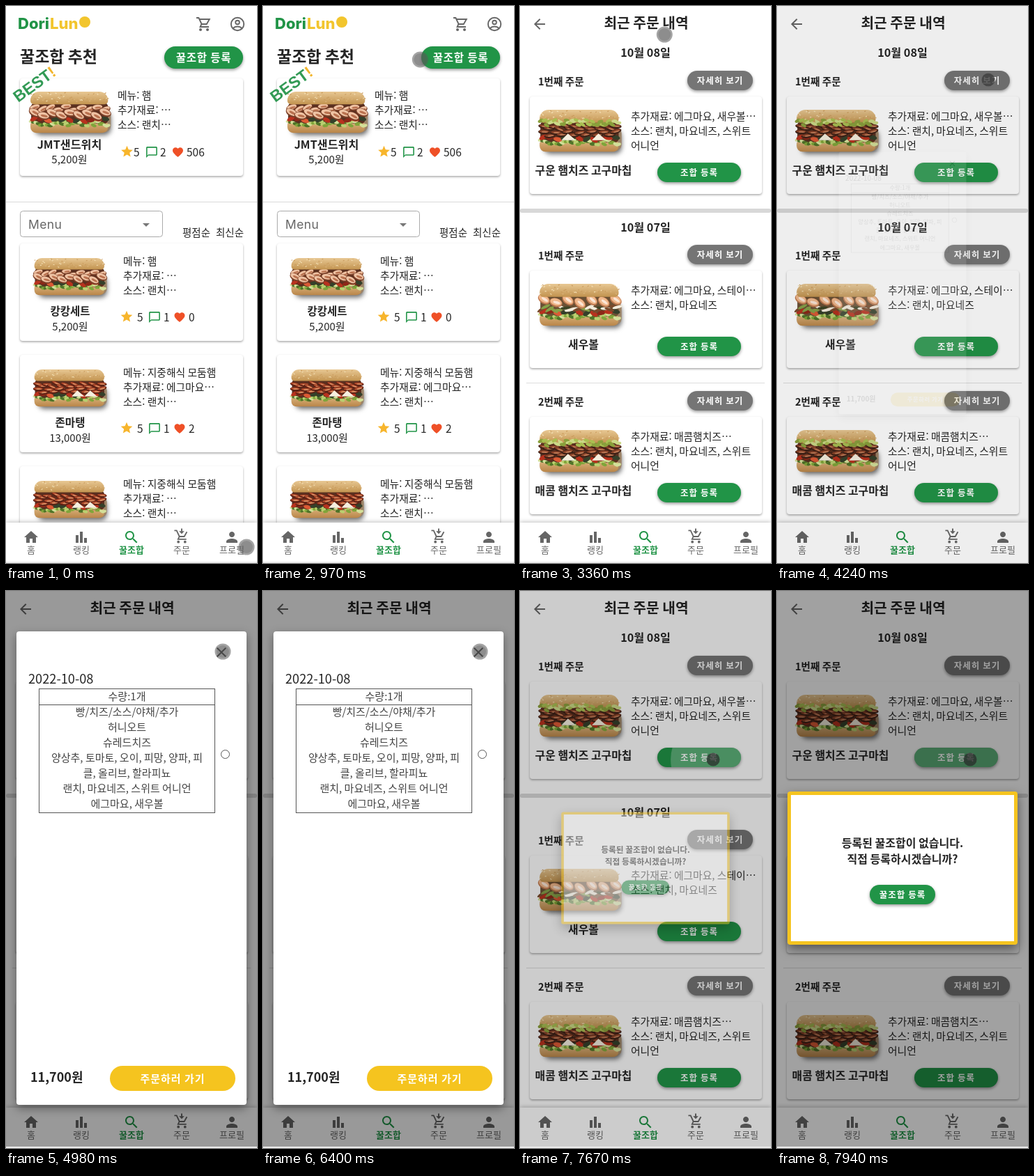
An HTML page with a canvas for the animation above (8000 ms loop, 360 px wide and 800 px high).

```html
<!DOCTYPE html>
<html lang="ko">
<head>
<meta charset="utf-8">
<title>Sandwich orders</title>
<style>
html, body { margin: 0; width: 100%; height: 100%; overflow: hidden; background: #fff; }
canvas { display: block; width: 100vw; height: 100vh; }
</style>
</head>
<body>
<canvas id="stage"></canvas>
<script>
const W = 360, H = 800, LOOP = 8000;
const GREEN = '#219447', YELLOW = '#f5c41f', INK = '#242424', GRAY = '#666';
const ratio = window.devicePixelRatio || 1;

function surface(canvas) {
  canvas.width = W * ratio;
  canvas.height = H * ratio;
  return canvas.getContext('2d');
}
const main = surface(document.getElementById('stage'));
const layer = surface(document.createElement('canvas'));
let c = main;

const ICONS = {
  home: 'M10 20v-6h4v6h5v-8h3L12 3 2 12h3v8z',
  bars: 'M4 9h4v11H4zm12 4h4v7h-4zm-6-9h4v16h-4z',
  search: 'M15.5 14h-.79l-.28-.27C15.41 12.59 16 11.11 16 9.5 16 5.91 13.09 3 9.5 3S3 5.91 3 9.5 5.91 16 9.5 16c1.61 0 3.09-.59 4.23-1.57l.27.28v.79l5 4.99L20.49 19zm-6 0C7.01 14 5 11.99 5 9.5S7.01 5 9.5 5 14 7.01 14 9.5 11.99 14 9.5 14z',
  person: 'M12 12c2.21 0 4-1.79 4-4s-1.79-4-4-4-4 1.79-4 4 1.79 4 4 4zm0 2c-2.67 0-8 1.34-8 4v2h16v-2c0-2.66-5.33-4-8-4z',
  star: 'M12 17.27 18.18 21l-1.64-7.03L22 9.24l-7.19-.61L12 2 9.19 8.63 2 9.24l5.46 4.73L5.82 21z',
  heart: 'M12 21.35l-1.45-1.32C5.4 15.36 2 12.28 2 8.5 2 5.42 4.42 3 7.5 3c1.74 0 3.41.81 4.5 2.09C13.09 3.81 14.76 3 16.5 3 19.58 3 22 5.42 22 8.5c0 3.78-3.4 6.86-8.55 11.54z',
  comment: 'M20 2H4c-1.1 0-2 .9-2 2v18l4-4h14c1.1 0 2-.9 2-2V4c0-1.1-.9-2-2-2zm0 14H6l-2 2V4h16z',
  back: 'M20 11H7.83l5.59-5.59L12 4l-8 8 8 8 1.41-1.41L7.83 13H20z',
  close: 'M19 6.41 17.59 5 12 10.59 6.41 5 5 6.41 10.59 12 5 17.59 6.41 19 12 13.41 17.59 19 19 17.59 13.41 12z',
  arrow: 'M11 0h2v4h3l-4 4-4-4h3z'
};
const LINES = {
  cart: 'M1 3h3.4l4.2 9h7.2l4-7H5.4M8.4 12l-1.8 4H19',
  open: 'M1 3h3.4l4.2 9h7.2l4-7M8.4 12l-1.8 4H19',
  user: 'M5.6 18.2c3-3.6 9.8-3.6 12.8 0'
};
for (const set of [ICONS, LINES]) for (const k in set) set[k] = new Path2D(set[k]);

const clamp = v => Math.max(0, Math.min(1, v));
const smooth = v => (v = clamp(v), v * v * (3 - 2 * v));

function text(s, x, y, size, o = {}) {
  const { color = INK, weight = 500, align = 'left', gap = 0, font = '"Noto Sans CJK KR", "Noto Sans CJK"' } = o;
  c.font = `${weight} ${size}px ${font}, sans-serif`;
  c.letterSpacing = gap + 'px';
  c.textAlign = align;
  c.fillStyle = color;
  c.fillText(s, x, y + size * 0.375);
}
const bold = (s, x, y, size, align = 'center') => text(s, x, y, size, { weight: 700, align });

function box(x, y, w, h, r, fill) {
  c.beginPath();
  c.roundRect(x, y, w, h, r);
  c.fillStyle = fill;
  c.fill();
}

function oval(x, y, rx, ry, fill, turn = 0) {
  c.beginPath();
  c.ellipse(x, y, rx, ry, turn, 0, 7);
  c.fillStyle = fill;
  c.fill();
}

function raised(x, y, w, h, r, fill, blur = 3, drop = 1.5, alpha = 0.35) {
  c.save();
  c.shadowColor = `rgba(0,0,0,${alpha})`;
  c.shadowBlur = blur * ratio;
  c.shadowOffsetY = drop * ratio;
  box(x, y, w, h, r, fill);
  c.restore();
}

function rule(x1, x2, y, color) {
  c.fillStyle = color;
  c.fillRect(x1, y, x2 - x1, 1);
}

function pill(x, y, w, h, fill, label, size = 12.5, gap = 1) {
  raised(x, y, w, h, h / 2, fill, 4, 2, 0.4);
  text(label, x + w / 2, y + h / 2, size, { color: '#fff', weight: 700, align: 'center', gap });
}

function at(x, y, size, draw) {
  c.save();
  c.translate(x - size / 2, y - size / 2);
  c.scale(size / 24, size / 24);
  draw();
  c.restore();
}

function icon(name, x, y, size, color) {
  at(x, y, size, () => {
    c.fillStyle = color;
    c.fill(ICONS[name], 'evenodd');
  });
}

function lineIcon(name, x, y, size) {
  at(x, y, size, () => {
    c.strokeStyle = c.fillStyle = GRAY;
    c.lineWidth = 1.9;
    c.stroke(LINES[name]);
    if (name === 'user') {
      c.beginPath();
      c.arc(12, 12, 9.2, 0, 7);
      c.moveTo(14.8, 9.5);
      c.arc(12, 9.5, 2.8, 0, 7);
      c.stroke();
    } else {
      oval(7, 20, 2, 2, GRAY);
      oval(17, 20, 2, 2, GRAY);
      if (name === 'open') c.fill(ICONS.arrow);
    }
  });
}

// Meat tones: edge, face, fold
const TONES = {
  ham: ['#7c4028', '#efc3a4', '#b9714f'],
  mixed: ['#5c2014', '#b04a2c', '#dc9468'],
  bacon: ['#3c2016', '#8a4228', '#c07c58'],
  prawn: ['#c07a50', '#f0b88c', '#fbe6d6']
};

// Simplified sandwich, drawn in a 120 x 58 box.
function sandwich(kind, x, y, scale) {
  let seed = 7;
  const rnd = () => (seed = seed * 16807 % 2147483647) / 2147483647;
  const pick = list => list[Math.floor(rnd() * list.length)];
  const row = (n, y0, spread, rx, ry, colors) => {
    for (let i = 0; i < n; i++) {
      oval(4 + 110 * (i + 0.5) / n, y0 + (rnd() - 0.5) * spread, rx, ry, pick(colors), (rnd() - 0.5) * 1.2);
    }
  };
  const bun = (by, h, r, top, low) => {
    const g = c.createLinearGradient(0, by, 0, by + h);
    g.addColorStop(0, top);
    g.addColorStop(1, low);
    box(4, by, 109, h, r, g);
  };
  const [edge, face, fold] = TONES[kind];
  const folds = (n, y0, rx, ry, turn) => {
    for (let i = 0; i < n; i++) {
      const fx = 10 + 99 * i / (n - 1), fy = y0 + (i % 2) * 4 + rnd() * 2;
      const a = turn + (rnd() - 0.5) * 0.5;
      oval(fx, fy, rx, ry, edge, a);
      oval(fx, fy - 0.8, rx - 1, ry - 1.3, face, a);
      oval(fx + 1, fy, rx * 0.55, ry * 0.3, fold, a);
    }
  };
  c.save();
  c.translate(x, y);
  c.scale(scale, scale);
  raised(10, 24, 107, 33, 9, '#9c8468', 7, 4, 0.6);
  bun(43, 15, [4, 4, 8, 8], '#d9b27c', '#b98548');
  box(5, 16, 108, 29, 5, kind === 'prawn' ? '#6a5034' : '#5a3020');
  row(34, 45, 7, 4, 2.2, ['#7fa53a', '#b9d070', '#4f7428', '#d3e09a']);
  row(11, 40, 4, 6, 3, ['#b8321e', '#dc5a34', '#8c2818', '#34402a']);
  if (kind === 'prawn') {
    row(20, 34, 6, 7, 2, ['#3c4424', '#7a4a2c', '#f3ecdc', '#86a048']);
    folds(7, 21, 9, 6, 0.5);
  } else if (kind === 'ham') {
    folds(10, 21, 8, 4.5, -0.3);
    folds(9, 29, 9, 5.5, 0.3);
  } else {
    folds(15, 22, 8, 3, 0.2);
    folds(13, 30, 8, 3.2, -0.2);
  }
  if (kind === 'bacon' || kind === 'mixed') {
    c.fillStyle = '#f5efdf';
    for (const px of kind === 'bacon' ? [34, 76] : [62, 82]) {
      c.beginPath();
      c.moveTo(px, 42);
      c.lineTo(px + 9, 33);
      c.lineTo(px + 20, 42);
      c.fill();
    }
  }
  bun(0, 18, [12, 12, 5, 5], '#e8c894', '#c2934f');
  row(60, 8, 13, 1.3, 0.6, ['#f5e2b8', '#c99a5c', '#dcb47a']);
  if (kind === 'bacon') row(40, 18, 8, 4, 2.2, ['#a9bf52', '#cbd987', '#8aa03c']);
  c.restore();
}

function lines(list, x, y, step, size) {
  list.forEach((s, i) => text(s, x, y + i * step, size));
}

function rating(y, xs, values) {
  icon('star', xs[0], y - 1, 20, '#f7b52c');
  icon('comment', xs[1], y, 19, GREEN);
  icon('heart', xs[2], y, 18, '#ef5027');
  values.forEach((v, i) => text(v, xs[i + 3], y, 15.5));
}

function menuCard(y, kind, name, price, info, values) {
  raised(20, y, 320, 140, 4, '#fff');
  sandwich(kind, 37, y + 21, 0.92);
  bold(name, 92, y + 97, 15.5);
  text(price, 92, y + 119, 15, { align: 'center' });
  lines(info, 168, y + 25, 21, 14.8);
  rating(y + 106, [173, 213, 249, 188, 226, 262], values);
}

function menuPage() {
  const logo = { weight: 800, font: 'Inter' };
  text('Dori', 17, 25, 22, { ...logo, color: GREEN });
  text('Lun', 63, 25, 22, { ...logo, color: '#f2c52d' });
  oval(113, 23, 8, 8, '#f2c52d');
  lineIcon('cart', 284, 26, 24);
  lineIcon('user', 332, 26, 24);
  bold('꿀조합 추천', 20, 72, 23, 'left');
  pill(227, 58, 113, 32, GREEN, '꿀조합 등록', 15.5, 0.8);

  raised(20, 104, 320, 140, 4, '#fff');
  sandwich('ham', 31, 123, 1.02);
  c.save();
  c.translate(40, 112);
  c.rotate(-0.63);
  const best = { weight: 700, font: '"Liberation Sans"' };
  text('BEST', -34, 0, 23, { ...best, color: '#329a55' });
  text('!', 27, 0, 23, { ...best, color: '#f2b52d' });
  c.restore();
  bold('JMT샌드위치', 91, 199, 16.2);
  text('5,200원', 91, 220, 15, { align: 'center' });
  lines(['메뉴: 햄', '추가재료: …', '소스: 랜치…'], 160, 128, 21, 14.8);
  rating(210, [173.5, 209, 246.5, 183, 221, 259], ['5', '2', '506']);

  rule(0, W, 281, '#d9d9d9');
  c.strokeStyle = '#aaa';
  c.lineWidth = 1;
  c.beginPath();
  c.roundRect(20.5, 294.5, 204, 37, 4);
  c.stroke();
  text('Menu', 32, 313, 17.5, { color: GRAY, weight: 400, font: 'Inter', gap: 0.4 });
  c.fillStyle = '#777';
  c.beginPath();
  c.moveTo(196, 312);
  c.lineTo(206, 312);
  c.lineTo(201, 317);
  c.fill();
  text('평점순', 253, 326, 14.5);
  text('최신순', 301, 326, 14.5);

  menuCard(341, 'ham', '캉캉세트', '5,200원', ['메뉴: 햄', '추가재료: …', '소스: 랜치…'], ['5', '1', '0']);
  menuCard(501, 'mixed', '존마탱', '13,000원', ['메뉴: 지중해식 모둠햄', '추가재료: 에그마요…', '소스: 랜치…'], ['5', '1', '2']);
  menuCard(661, 'mixed', '', '', ['메뉴: 지중해식 모둠햄', '추가재료: …', '소스: 랜치…'], ['', '', '']);
}

function orderCard(y, kind, label, name, info) {
  text(label, 26, y - 21, 14.6, { weight: 700 });
  pill(240, y - 37, 94, 28, '#757575', '자세히 보기');
  raised(14, y, 333, 140, 4, '#fff');
  sandwich(kind, 24, y + 19, 1.04);
  bold(name, 91, y + 106, 15.9);
  lines(info, 159, y + 28, 21, 14.8);
  pill(197, y + 95, 120, 28, GREEN, '조합 등록');
}

function ordersPage() {
  icon('back', 28, 26, 24, GRAY);
  bold('최근 주문 내역', 181, 24, 20.3);
  bold('10월 08일', 180, 67, 16.2);
  orderCard(130, 'bacon', '1번째 주문', '구운 햄치즈 고구마칩', ['추가재료: 에그마요, 새우볼…', '소스: 랜치, 마요네즈, 스위트', '어니언']);
  box(0, 291, W, 6, 3, '#d8d8d8');
  bold('10월 07일', 180, 318, 16.2);
  orderCard(380, 'prawn', '1번째 주문', '새우볼', ['추가재료: 에그마요, 스테이…', '소스: 랜치, 마요네즈']);
  rule(9, 351, 541, '#ddd');
  orderCard(590, 'bacon', '2번째 주문', '매콤 햄치즈 고구마칩', ['추가재료: 매콤햄치즈…', '소스: 랜치, 마요네즈, 스위트', '어니언']);
}

function tabBar() {
  raised(0, 742, W, 60, 0, '#fff', 6, -1, 0.25);
  rule(0, W, 798, '#eee');
  rule(0, W, 799, '#eee');
  ['홈', '랭킹', '꿀조합', '주문', '프로필'].forEach((s, i) => {
    const x = 36 + i * 72, on = i === 2, color = on ? GREEN : GRAY;
    if (i === 3) lineIcon('open', x, 762, 23);
    else icon(['home', 'bars', 'search', '', 'person'][i], x, 763, 24, color);
    text(s, x, 781, 13, { color, align: 'center', weight: on ? 700 : 400 });
  });
}

function detailDialog(t) {
  raised(15, 58, 330, 680, 4, '#fff', 14, 5, 0.4);
  if (t > 6450) {
    const r = 16 * clamp((t - 6450) / 200);
    oval(311, 87, r, r, 'rgba(0,0,0,.16)');
  }
  icon('close', 309, 88, 24, '#222');
  text('2022-10-08', 32, 126, 18.2, { weight: 400 });
  c.strokeStyle = '#555';
  c.lineWidth = 1;
  c.strokeRect(47.5, 140.5, 252, 178);
  rule(48, 300, 163, '#555');
  const cell = { color: '#444', weight: 400, align: 'center' };
  text('수량:1개', 173.5, 151, 15, cell);
  ['빵/치즈/소스/야채/추가', '허니오트', '슈레드치즈', '양상추, 토마토, 오이, 피망, 양파, 피', '클, 올리브, 할라피뇨',
    '랜치, 마요네즈, 스위트 어니언', '에그마요, 새우볼'].forEach((s, i) => text(s, 173.5, 173 + i * 22, 15, cell));
  c.beginPath();
  c.arc(314.5, 234.5, 6, 0, 7);
  c.stroke();
  bold('11,700원', 35, 698, 18, 'left');
  box(149, 682, 180, 36, 18, YELLOW);
  text('주문하러 가기', 239, 700, 15, { color: '#fff', weight: 700, align: 'center', gap: 1 });
}

function registerDialog() {
  raised(15, 288, 330, 220, 4, YELLOW, 16, 6, 0.5);
  box(20, 293, 320, 210, 0, '#fff');
  bold('등록된 꿀조합이 없습니다.', 180, 362, 16);
  bold('직접 등록하시겠습니까?', 180, 385, 16);
  pill(133, 422, 94, 28, GREEN, '꿀조합 등록');
}

function scaled(ctx) {
  ctx.setTransform(ratio, 0, 0, ratio, 0, 0);
  return ctx;
}

// The dialog goes through its own layer so that it fades as a whole.
function popup(p, dim, draw, t) {
  if (p <= 0) return;
  c.fillStyle = `rgba(0,0,0,${dim * Math.pow(p, 0.8)})`;
  c.fillRect(0, 0, W, 798);
  c = scaled(layer);
  c.clearRect(0, 0, W, H);
  c.translate(180, 398);
  c.scale(0.5 + p / 2, 0.5 + p / 2);
  c.translate(-180, -398);
  draw(t);
  c = main;
  c.globalAlpha = p;
  c.drawImage(layer.canvas, 0, 0, W, H);
  c.globalAlpha = 1;
}

function ripple(x, y, w, h, px, py, age) {
  if (age <= 0) return;
  c.save();
  c.beginPath();
  c.roundRect(x, y, w, h, h / 2);
  c.clip();
  const r = 110 * smooth(age / 450);
  oval(px, py, r, r, 'rgba(255,255,255,.27)');
  c.restore();
}

// Touch marker: time, x, y
const PATH = [
  [0, 345, 777], [70, 345, 777], [140, 309, 574], [340, 309, 574], [480, 321, 470], [620, 312, 290],
  [780, 245, 110], [900, 200, 80], [1040, 250, 74], [1110, 302, 92], [1400, 280, 85], [1780, 283, 72],
  [2250, 283, 72], [2700, 245, 58], [3010, 205, 45], [3360, 207, 41], [3500, 248, 55], [3700, 248, 55],
  [4000, 303, 106], [4500, 303, 106], [4800, 311, 87], [5450, 311, 87], [5660, 312, 235], [5870, 311, 87],
  [6780, 311, 87], [6930, 309, 134], [7250, 277, 242], [8000, 277, 242]
];
const PRESSES = [[1980, 2250], [4080, 4330], [6450, 6700], [7430, 8000]];

function pointer(t) {
  const i = PATH.findIndex(k => k[0] > t);
  const a = PATH[i - 1], b = PATH[i];
  const p = (t - a[0]) / (b[0] - a[0]);
  const x = a[1] + (b[1] - a[1]) * p, y = a[2] + (b[2] - a[2]) * p;
  if (PRESSES.some(w => t >= w[0] && t < w[1])) {
    oval(x, y, 9.5, 9.5, 'rgba(40,40,40,.7)');
  } else {
    oval(x, y, 11.5, 11.5, 'rgba(90,90,90,.55)');
    oval(x, y, 9, 9, 'rgba(90,90,90,.3)');
  }
}

function render(t) {
  scaled(c);
  c.fillStyle = '#fff';
  c.fillRect(0, 0, W, H);
  if (t < 2250) menuPage();
  else ordersPage();
  if (t < 4400) ripple(240, 93, 94, 28, 303, 106, t - 4160);
  ripple(197, 225, 120, 28, 277, 242, t - 7430);
  tabBar();
  popup(smooth((t - 4185) / 275) - smooth((t - 6735) / 275), 0.4, detailDialog, t);
  popup(smooth((t - 7540) / 275), 0.37, registerDialog, t);
  pointer(t);
}

const start = performance.now();
function tick() {
  render((performance.now() - start) % LOOP);
  requestAnimationFrame(tick);
}
tick();
</script>
</body>
</html>
```
